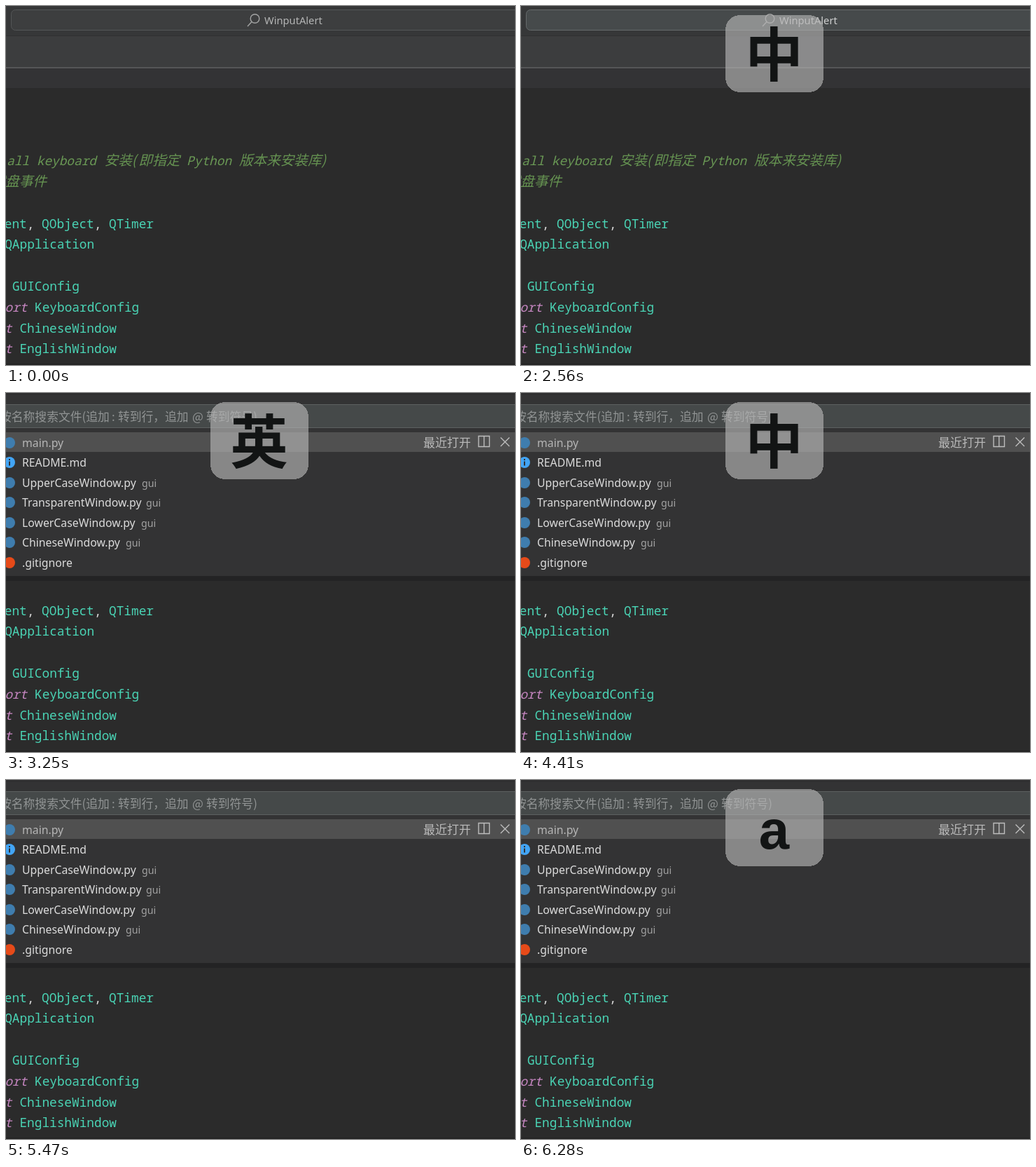
Recreate the animation shown at these times as an HTML page. Size 727x512 px, loop 7.11 s.

```html
<!DOCTYPE html>
<html lang="zh-CN">
<head>
<meta charset="utf-8">
<style>
  html, body { margin: 0; width: 100%; height: 100%; overflow: hidden; background: #2b2b2b; }
  svg { display: block; width: 727px; height: 512px; }
  text { white-space: pre; font-family: "Noto Sans", "Noto Sans CJK SC", sans-serif; }
  .code text { font: 500 17.77px "Noto Sans Mono", monospace; fill: #4ad4b5; }
  .code .comment { font-style: italic; fill: #6a9955; }
  .code .cjk { font: italic 300 19.6px "Noto Sans CJK SC", sans-serif; fill: #659251; }
  .code .keyword { font-style: italic; fill: #c586c0; }
  .comma { fill: #d4d4d4; }
  .hint text { font: 16.8px "Noto Sans CJK SC", sans-serif; fill: #919494; }
  #badge text { text-anchor: middle; fill: #121414; font: bold 82.5px "Noto Sans CJK SC", sans-serif; }
  #badge text.lower { font: bold 78px "Liberation Sans", sans-serif; }
  #badge text.upper { font: bold 77px "Noto Sans Mono", monospace; }
</style>
</head>
<body>
<svg viewBox="0 0 727 512">
  <rect width="727" height="512" fill="#2b2b2b"/>
  <rect y="510" width="727" height="2" fill="#242424"/>

  <g class="code" transform="translate(.6 0)">
    <text class="comment" x="0.5" y="227">all keyboard</text>
    <text class="cjk" x="140" y="227">安装(</text>
    <text class="cjk" x="189" y="227">即指定</text>
    <text class="comment" x="257.5" y="227">Python</text>
    <text class="cjk" x="332.4" y="227">版本来安装库)</text>
    <text class="cjk" x="-21" y="257">键盘事件</text>
    <text x="-34.8" y="317">QEvent<tspan class="comma">, </tspan>QObject<tspan class="comma">, </tspan>QTimer</text>
    <text x="-2.4" y="346">QApplication</text>
    <text x="8.3" y="406">GUIConfig</text>
    <text x="-34.2" y="436"><tspan class="keyword">import </tspan>KeyboardConfig</text>
    <text x="-55.8" y="466"><tspan class="keyword">import </tspan>ChineseWindow</text>
    <text x="-55.8" y="495"><tspan class="keyword">import </tspan>EnglishWindow</text>
  </g>

  <g id="titlebar">
    <rect width="727" height="42" fill="#363738"/>
    <rect y="42" width="727" height="45" fill="#3c3d3e"/>
    <rect y="42" width="727" height="1" fill="#303031"/>
    <rect y="87" width="727" height="2" fill="#555657"/>
    <rect y="89" width="727" height="28" fill="#333335"/>
    <rect id="search" x="7.5" y="5.5" width="740" height="29" rx="6"/>
    <g fill="none" stroke="#a3a4a4" stroke-width="1.4">
      <circle cx="355.5" cy="18" r="6.3"/>
      <path d="M351 22.5L345 29"/>
    </g>
    <text id="title" x="369" y="26" font-size="14.7">WinputAlert</text>
  </g>

  <g id="panel">
    <rect width="727" height="261" fill="#333334"/>
    <rect width="727" height="3" fill="#2f2f30"/>
    <rect y="261" width="727" height="7" fill="#232324"/>
    <rect x="-20" y="16.5" width="780" height="33" fill="#454949" stroke="#5d6161"/>
    <g class="hint">
      <text x="-9" y="40">按名称搜索文件(追加</text>
      <text x="151" y="40">:</text>
      <text x="160" y="40">转到行，</text>
      <text x="227" y="40">追加</text>
      <text x="266" y="40">@</text>
      <text x="286" y="40">转到符号)</text>
    </g>
    <g id="files">
      <rect y="56" width="727" height="28" fill="#505050"/>
      <text x="596" y="77" font-size="17" fill="#b9b9b9">最近打开</text>
      <path d="M675 61.5H690.5V76.5H675ZM682.8 61.5V76.5M706.5 63.5L719 76M719 63.5L706.5 76"
            fill="none" stroke="#bcbcbc" stroke-width="1.4"/>
    </g>
  </g>

  <g id="badge">
    <rect x="292" y="13" width="140" height="110" rx="21" fill="#b4b4b4" fill-opacity=".65"
          shape-rendering="crispEdges"/>
    <text id="glyph" x="361.5"></text>
  </g>
</svg>

<script>
const LOOP = 7110;
const $ = id => document.getElementById(id);
const titlebar = $('titlebar'), search = $('search'), title = $('title'), panel = $('panel');
const files = $('files'), badge = $('badge'), glyph = $('glyph');

// Each state of the badge holds until the next time; an empty string hides it.
const states = [
  [0, ''], [1530, 'a'], [1820, 'A'], [2560, '中'], [3250, '英'], [3750, '中'],
  [4080, '英'], [4410, '中'], [4610, ''], [4690, 'A'], [5190, '英'], [5310, '中'],
  [5470, ''], [5510, 'A'], [5840, ''], [6000, 'A'], [6280, 'a']
];

// name, icon colour, and the folder with its x position
const PY = '#3f7dae';
const rows = [
  ['main.py', PY], ['README.md', '#42a5f5'],
  ['UpperCaseWindow.py', PY, 'gui', 194], ['TransparentWindow.py', PY, 'gui', 200],
  ['LowerCaseWindow.py', PY, 'gui', 193], ['ChineseWindow.py', PY, 'gui', 171],
  ['.gitignore', '#e64a19']
];

function add(tag, attrs, content = '') {
  const node = document.createElementNS('http://www.w3.org/2000/svg', tag);
  for (const key in attrs) node.setAttribute(key, attrs[key]);
  node.textContent = content;
  files.append(node);
}

rows.forEach(([name, color, folder, x], i) => {
  const y = 77 + Math.round(i * 28.45);
  add('circle', { cx: 5, cy: y - 6, r: 8, fill: color });
  if (name === 'README.md') add('path', { d: `M4 ${y - 11}h2v2h-2zM4 ${y - 7.5}h2v6h-2z`, fill: '#2d3338' });
  add('text', { x: 23, y, 'font-size': 15.8, fill: i ? '#dcdcdc' : '#b5b5b5' }, name);
  if (folder) add('text', { x, y, 'font-size': 14.2, fill: '#a2a2a2' }, folder);
});

const show = (node, on) => node.setAttribute('visibility', on ? 'inherit' : 'hidden');

function draw() {
  const t = performance.now() % LOOP;
  const hover = t >= 580, open = t >= 2930;
  search.setAttribute('fill', hover ? '#464a4b' : '#3d3e3f');
  search.setAttribute('stroke', hover ? '#666a6b' : '#545657');
  title.setAttribute('fill', hover ? '#cfd0d0' : '#b4b5b5');
  show(titlebar, !open);
  show(panel, open);
  show(files, t >= 3010);

  const label = states.findLast(([start]) => t >= start)[1];
  show(badge, label);
  if (glyph.textContent !== label) {
    glyph.textContent = label;
    glyph.setAttribute('class', label === 'a' ? 'lower' : label === 'A' ? 'upper' : '');
    glyph.setAttribute('y', label.toLowerCase() === 'a' ? 98 : 100);
  }
  requestAnimationFrame(draw);
}
draw();
</script>
</body>
</html>
```
